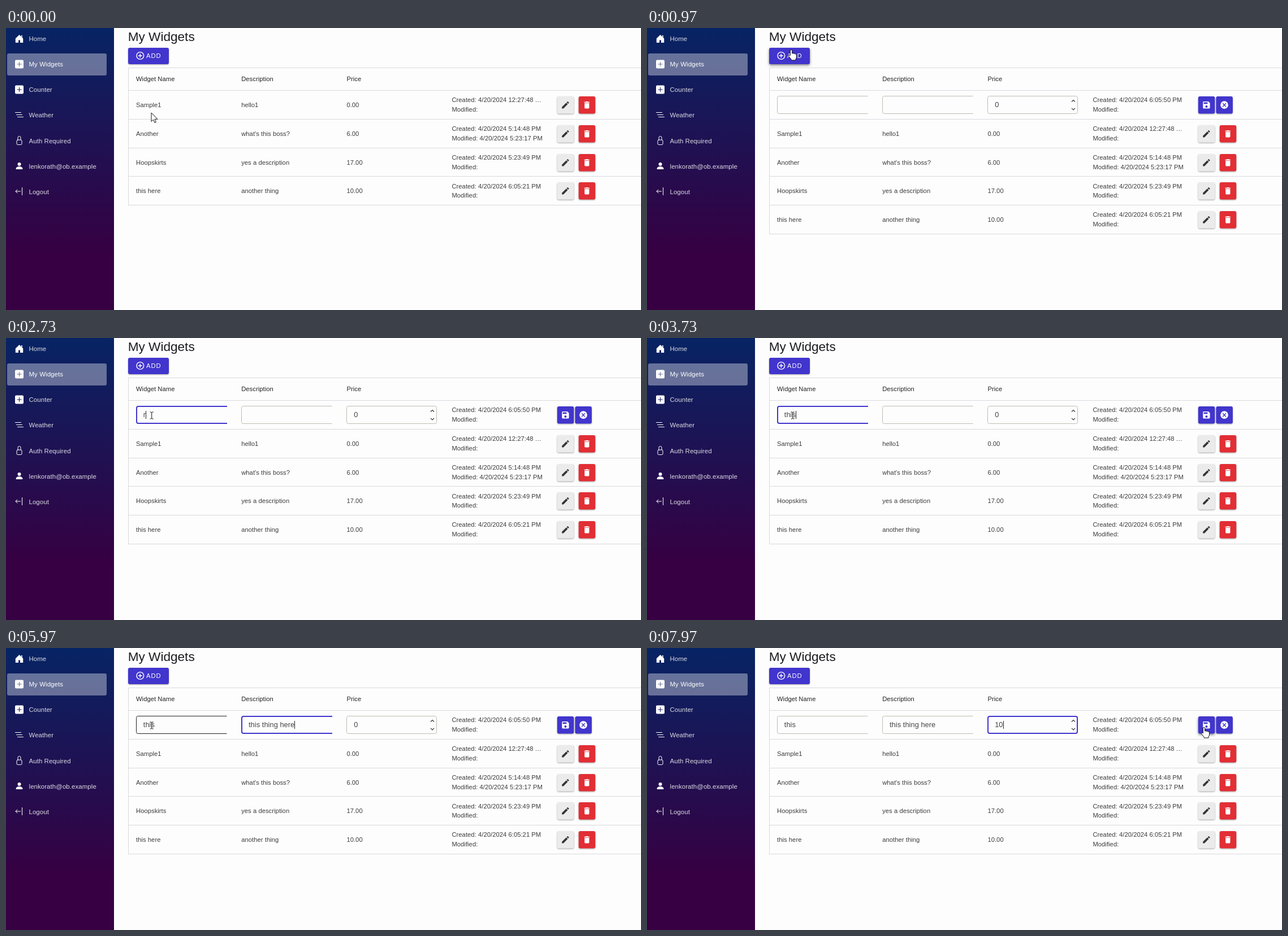
Animation, 1123 px wide and 499 px high, one loop 8000 ms. Source, as an HTML page:

```html
<!DOCTYPE html>
<html lang="en">
<head>
<meta charset="utf-8">
<title>My Widgets</title>
<style>
  html, body { margin: 0; width: 100%; height: 100%; overflow: hidden; background: #fdfdfd; }
  svg { display: block; }
  text { font: 11.2px "Liberation Sans", Arial, sans-serif; letter-spacing: .06px; fill: #3b3b3b; white-space: pre; }
  .nav text { font-size: 11.4px; letter-spacing: .1px; fill: #dcdce2; }
  .nav .on text { fill: #fff; }
  .title { font-size: 22.6px; letter-spacing: 0; fill: #1c1c20; }
  .head { fill: #222; }
  .add { letter-spacing: 1px; fill: #fff; }
  .field text { font-size: 12.8px; fill: #444; }
  .line { fill: #dadade; }
  .button { filter: drop-shadow(0 1px 1px rgba(0, 0, 0, .35)); }
  .button.over { filter: drop-shadow(0 2px 2px rgba(0, 0, 0, .5)); }
  .stroke { fill: none; stroke: #fff; stroke-linecap: round; stroke-linejoin: round; }
  .edge { fill: none; }
</style>
</head>
<body>
<svg id="stage" width="1123" height="499" viewBox="0 0 1123 499"></svg>
<script>
const LOOP = 8000, INSERT_AT = 890, PITCH = 50.75;
const BLUE = '#4135cd', RED = '#e22e35', GREY = '#ebebeb';
const COLS = [230, 416.2, 602.4, 788.4];

const icons = {
  edit: 'M3 17.2V21h3.8L17.8 9.9 14.1 6.2ZM20.7 7c.4-.4.4-1 0-1.4L18.4 3.3c-.4-.4-1-.4-1.4 0L15.1 5.1 18.9 8.9Z',
  trash: 'M6 19c0 1.1.9 2 2 2h8c1.1 0 2-.9 2-2V7H6ZM19 4h-3.5l-1-1h-5l-1 1H5v2h14Z',
  save: 'M17 3H5a2 2 0 0 0-2 2v14a2 2 0 0 0 2 2h14a2 2 0 0 0 2-2V7ZM12 13a3 3 0 0 1 0 6a3 3 0 0 1 0-6ZM5 5h10v4H5Z',
  cancel: 'M12 2a10 10 0 0 1 0 20a10 10 0 0 1 0-20ZM7 8.4 10.6 12 7 15.6 8.4 17 12 13.4 15.6 17 17 15.6 13.4 12 17 8.4 15.6 7 12 10.6 8.4 7Z',
  add: 'M12 2a10 10 0 0 1 0 20a10 10 0 0 1 0-20ZM12 4a8 8 0 0 0 0 16a8 8 0 0 0 0-16ZM11 7h2v4h4v2h-4v4h-2v-4H7v-2h4Z'
};
const cursors = {
  arrow: 'M0 0V15.5L3.5 12.2 6 17.6 8.3 16.6 6 11.3H11Z',
  hand: 'M-1.7 9.5V1.2a1.7 1.7 0 0 1 3.4 0V6q1.5-1 3 .4 1.6-.8 2.8.6 2-.4 2 1.8V12q0 2.5-1.5 4V18H0V16.5L-4.5 10.8q-.5-2 1.2-1.8Z',
  beam: 'M-3-6h2L0-5 1-6H3M0-5V5M-3 6h2L0 5 1 6H3'
};

// Whole-pixel baselines keep the small type crisp
const text = (x, y, s, cls = '') => `<text x="${x}" y="${Math.round(y)}" class="${cls}">${s}</text>`;
const line = (x, y, w, h) => `<rect class="line" x="${x}" y="${y}" width="${w}" height="${h}"/>`;
const icon = (name, cx, cy, size, fill) =>
  `<path transform="translate(${cx - size / 2} ${cy - size / 2}) scale(${size / 24})" fill="${fill}" fill-rule="evenodd" d="${icons[name]}"/>`;
const button = (id, x, y, w, h, fill, inner) =>
  `<g class="button" ${id && `id="${id}"`}><rect x="${x}" y="${y}" width="${w}" height="${h}" rx="3" fill="${fill}"/>${inner}</g>`;
const iconButton = (id, x, cy, fill, name, ink) => {
  const y = Math.round(cy - 15);
  return button(id, x, y, 29.5, 30.5, fill, icon(name, x + 14.6, y + 15.2, 16.5, ink));
};

function sidebar() {
  const plus = '<path fill="#fff" fill-rule="evenodd" d="M2.5.5h11a2 2 0 0 1 2 2v11a2 2 0 0 1-2 2h-11a2 2 0 0 1-2-2v-11a2 2 0 0 1 2-2ZM7.5 4v3.5H4v1h3.5V12h1V8.5H12v-1H8.5V4Z"/>';
  const items = [
    ['Home', '<path fill="#fff" d="M8 1 14.7 7.5V15H9.5V10.5H6.5V15H1.3V7.5ZM11 2h2.2v5Z"/>'],
    ['My Widgets', plus],
    ['Counter', plus],
    ['Weather', '<path class="stroke" d="M1 3.5H11M3 7.5H13M5 11.5H15"/>'],
    ['Auth Required', '<path class="stroke" d="M5.5 7V3a2.5 2.5 0 0 1 5 0V7"/><rect class="stroke" x="3.5" y="7" width="9" height="8.5" rx="1.8"/>'],
    ['lenkorath@ob.example', '<circle cx="8" cy="5" r="3" fill="#fff"/><path fill="#fff" d="M3 14s-1 0-1-1 1-4 6-4 6 3 6 4-1 1-1 1Z"/>'],
    ['Logout', '<path class="stroke" d="M10 8H1.5M4.5 5 1.5 8 4.5 11M13 1.5V14.5"/>']
  ];
  return `<linearGradient id="night" x2="0" y2="1"><stop stop-color="#072464"/><stop offset=".8" stop-color="#360042"/></linearGradient>
    <rect width="191" height="499" fill="url(#night)"/>
    <rect x="2" y="45" width="176" height="39" rx="3" fill="#fff" fill-opacity=".37"/><g class="nav">` +
    items.map(([label, mark], i) => {
      const y = 19 + i * 45.08;
      return `<g class="${i === 1 ? 'on' : ''}"><g transform="translate(15.5 ${Math.round(y - 8)})">${mark}</g>${text(40.5, y + 4.2, label)}</g>`;
    }).join('') + '</g>';
}

const records = [
  ['Sample1', 'hello1', '0.00', '12:27:48 …', ''],
  ['Another', "what's this boss?", '6.00', '5:14:48 PM', '4/20/2024 5:23:17 PM'],
  ['Hoopskirts', 'yes a description', '17.00', '5:23:49 PM', ''],
  ['this here', 'another thing', '10.00', '6:05:21 PM', '']
];
const stamps = (cy, created, modified) =>
  text(COLS[3], cy - 4.7, 'Created: 4/20/2024 ' + created) + text(COLS[3], cy + 12.2, 'Modified: ' + modified);
const frameRow = i => {
  const y = Math.round(110 + i * PITCH), end = Math.round(110 + (i + 1) * PITCH);
  return line(216, y, 1, end - y) + line(216, end, 907, 1);
};
const rows = first => records.map(([name, about, price, created, modified], i) => {
  const n = first + i, cy = 136 + n * PITCH;
  return frameRow(n) + [name, about, price].map((s, c) => text(COLS[c], cy + 4, s)).join('') +
    stamps(cy, created, modified) +
    iconButton('', 974.8, cy, GREY, 'edit', '#333') + iconButton('', 1012.7, cy, RED, 'trash', '#fff');
}).join('');

// Field outline drawn inside its box; text fields are open on the right
function outline(c, thick) {
  const l = Math.floor(COLS[c]) + thick / 2, t = 120 + thick / 2, b = 152 - thick / 2, r = l + 160 - thick;
  return c < 2
    ? `M${l + 160} ${t}H${l + 3}Q${l} ${t} ${l} ${t + 3}V${b - 3}Q${l} ${b} ${l + 3} ${b}H${l + 160}`
    : `M${l + 3} ${t}H${r - 3}Q${r} ${t} ${r} ${t + 3}V${b - 3}Q${r} ${b} ${r - 3} ${b}H${l + 3}Q${l} ${b} ${l} ${b - 3}V${t + 3}Q${l} ${t} ${l + 3} ${t}Z`;
}
const fields = [0, 1, 2].map(c =>
  `<g class="field"><path class="edge"/>${text(COLS[c] + 12.8, 140, '')}</g>`).join('');

stage.innerHTML = sidebar() + text(215.7, 23, 'My Widgets', 'title') +
  button('add', 216, 35, 72, 29, BLUE, icon('add', 237.3, 49, 17, '#fff') + text(248, 53, 'ADD', 'add')) +
  line(216, 70, 907, 1) + line(216, 70, 1, 40) + line(216, 110, 907, 1) +
  ['Widget Name', 'Description', 'Price'].map((s, c) => text(COLS[c], 94, s, 'head')).join('') +
  `<g id="before">${rows(0)}</g><g id="after">${frameRow(0)}${fields}
    <path d="M751 130.5l3-3 3 3M751 141.8l3 3 3-3" fill="none" stroke="#333" stroke-width="1.2"/>
    ${stamps(136, '6:05:50 PM', '')}
    ${iconButton('save', 974.8, 136, BLUE, 'save', '#fff')}${iconButton('', 1006.4, 136, BLUE, 'cancel', '#fff')}${rows(1)}</g>
  <rect id="caret" y="129" width="1" height="14" fill="#222"/><path id="pointer" stroke="#111"/>`;

// Pointer stops: time, x, y
const stops = [[0, 257, 150], [120, 257, 150], [700, 255, 39], [1030, 255, 39], [1400, 258, 138],
  [1800, 258, 138], [2000, 257.7, 137], [7150, 257.7, 137], [7800, 985, 141], [LOOP, 985, 141]];

// Edits: time, field, value
const typing = (start, gap, field, added, base = '') =>
  [...added].map((_, i) => [start + i * gap, field, base + added.slice(0, i + 1)]);
const edits = [
  [1850, 0, ''], [2650, 0, 'r'], [2980, 0, ''], ...typing(3250, 90, 0, 'this'),
  [3950, 1, ''], ...typing(4200, 90, 1, 'this'), ...typing(4750, 80, 1, ' thing here', 'this'),
  [6200, 2, '0'], ...typing(6600, 150, 2, '10')
];

function pointerAt(t) {
  const i = stops.findIndex(s => s[0] > t), [t0, x0, y0] = stops[i - 1], [t1, x1, y1] = stops[i];
  const p = (t - t0) / (t1 - t0), k = p * p * (3 - 2 * p);
  return [x0 + (x1 - x0) * k, y0 + (y1 - y0) * k];
}

const fieldNodes = [...document.querySelectorAll('.field')].map(g => ({ edge: g.children[0], label: g.children[1] }));

function draw(t) {
  const inserted = t >= INSERT_AT, [x, y] = pointerAt(t);
  const inside = (l, top, r, b) => x >= l && x <= r && y >= top && y <= b;
  before.style.display = inserted ? 'none' : '';
  after.style.display = inserted ? '' : 'none';

  const values = ['', '', '0'];
  let focus = -1, edited = 0;
  for (const [at, field, value] of edits) if (at <= t) {
    values[field] = value;
    focus = field;
    edited = at;
  }

  let overField = false;
  fieldNodes.forEach(({ edge, label }, c) => {
    const over = inserted && inside(COLS[c], 120, COLS[c] + 160, 152);
    const thick = c === focus ? 2 : 1;
    overField ||= over;
    edge.setAttribute('d', outline(c, thick));
    edge.setAttribute('stroke', c === focus ? BLUE : over ? '#222' : '#bdbdb3');
    edge.setAttribute('stroke-width', thick);
    label.textContent = values[c];
  });

  caret.style.display = focus >= 0 && (t - edited) % 1000 < 500 ? '' : 'none';
  if (focus >= 0)
    caret.setAttribute('x', Math.round(COLS[focus] + 12.8 + fieldNodes[focus].label.getComputedTextLength()));

  const overAdd = inside(216, 35, 288, 64), overSave = inserted && inside(975, 121, 1004, 152);
  add.classList.toggle('over', overAdd);
  save.classList.toggle('over', overSave);

  const shape = overAdd || overSave ? 'hand' : overField ? 'beam' : 'arrow';
  pointer.setAttribute('d', cursors[shape]);
  pointer.setAttribute('fill', shape === 'beam' ? 'none' : '#fff');
  pointer.setAttribute('transform', `translate(${x} ${y})`);
}

const begin = performance.now();
function tick() {
  draw((performance.now() - begin) % LOOP);
  requestAnimationFrame(tick);
}
tick();
</script>
</body>
</html>
```
